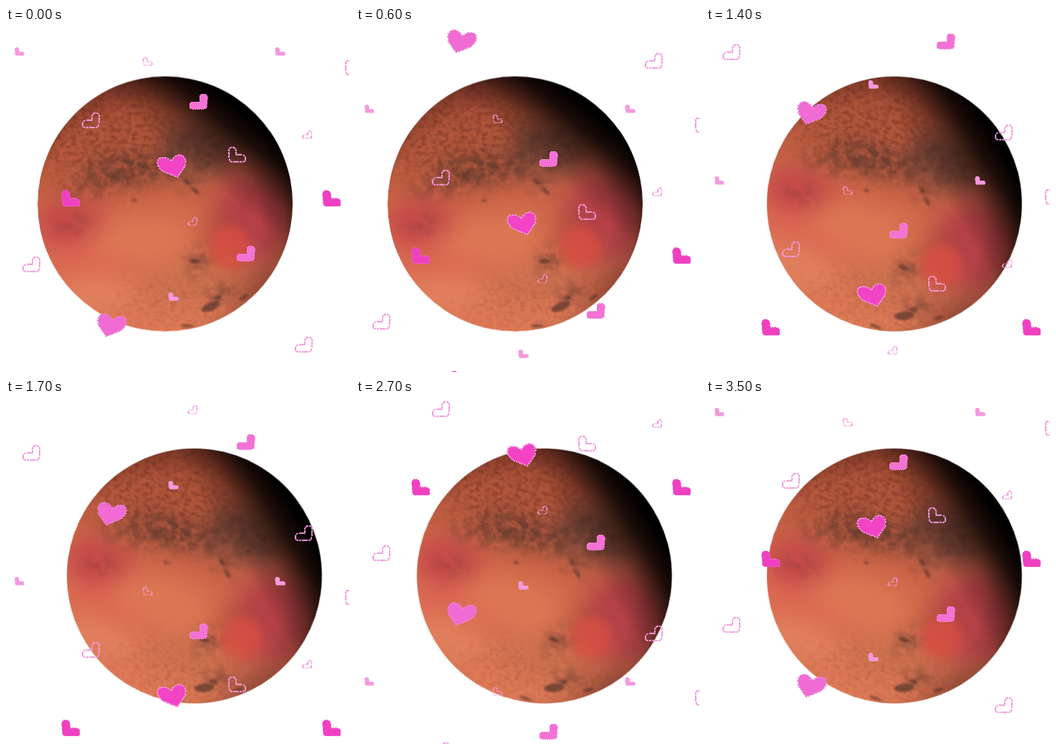
Animation of 480 by 480 pixels, one loop 3.6 s. Source, as an HTML page:

```html
<!DOCTYPE html>
<html lang="en">
<head>
<meta charset="utf-8">
<title>Planet and hearts</title>
<style>
  html, body { margin: 0; width: 100%; height: 100%; overflow: hidden; background: #fff; }
  svg { display: block; width: 480px; height: 480px; }

  .planet { animation: wobble 1.8s step-end infinite; }
  @keyframes wobble {
    0%, 100% { transform: translate(222px, 245.5px); }
    50% { transform: translate(262.8px, 245.5px) rotate(19deg); }
  }

  /* 40px every 300ms, split into two hops of 20px at 0ms and 200ms */
  .fall { animation: fall 3.6s steps(12, end) infinite; }
  .hop { animation: hop .3s step-end infinite; }
  @keyframes fall { from { transform: translateY(0); } to { transform: translateY(480px); } }
  @keyframes hop {
    0%, 100% { transform: translateY(0); }
    66.667% { transform: translateY(20px); }
  }

  #tile { shape-rendering: crispEdges; }
  .line { fill: none; stroke: #f19adc; stroke-width: 2; stroke-dasharray: 4 .6; }
  .hot { fill: #f040c2; stroke: #ea62c6; stroke-dasharray: 2 1; }
  .soft { fill: #f471d5; stroke: #ee8ad6; stroke-dasharray: 2 1; }
  .pale { fill: #f599df; stroke: #f2a4de; }
  .big { fill: #f343c6; stroke: #f08fd9; stroke-width: 2; stroke-dasharray: 3 1; }
  .bigsoft { fill: #f06bd3; stroke: #ea7fd2; stroke-width: 2; stroke-dasharray: 3 1; }
</style>
</head>
<body>
<svg viewBox="0 0 480 480">
  <defs>
    <clipPath id="disc"><circle r="178"/></clipPath>
    <linearGradient id="ground" x1=".35" y1="0" x2=".45" y2="1">
      <stop offset="0" stop-color="#a04a33"/>
      <stop offset=".3" stop-color="#b85a3f"/>
      <stop offset=".55" stop-color="#d36a4d"/>
      <stop offset="1" stop-color="#de7b58"/>
    </linearGradient>
    <linearGradient id="night" gradientUnits="userSpaceOnUse" x1="0" y1="0" x2="116" y2="-138">
      <stop offset=".36" stop-color="#0c0504" stop-opacity="0"/>
      <stop offset=".56" stop-color="#0c0504" stop-opacity=".3"/>
      <stop offset=".78" stop-color="#080302" stop-opacity=".84"/>
      <stop offset=".94" stop-color="#000"/>
    </linearGradient>
    <radialGradient id="limb" gradientUnits="userSpaceOnUse" cx="-25" cy="25" r="213">
      <stop offset=".74" stop-color="#2a0c0c" stop-opacity="0"/>
      <stop offset=".9" stop-color="#1a0608" stop-opacity=".38"/>
      <stop offset="1" stop-color="#120406" stop-opacity=".9"/>
    </radialGradient>
    <filter id="blur" x="-60%" y="-60%" width="220%" height="220%"><feGaussianBlur stdDeviation="16"/></filter>
    <filter id="soften" x="-60%" y="-60%" width="220%" height="220%"><feGaussianBlur stdDeviation="6"/></filter>
    <filter id="spot" x="-50%" y="-50%" width="200%" height="200%"><feGaussianBlur stdDeviation="1.6"/></filter>
    <filter id="rough" filterUnits="userSpaceOnUse" x="-190" y="-190" width="380" height="380" color-interpolation-filters="sRGB">
      <feGaussianBlur in="SourceGraphic" stdDeviation="10" result="area"/>
      <feTurbulence type="fractalNoise" baseFrequency=".07" numOctaves="4" seed="7"/>
      <feColorMatrix values="0 0 0 0 .37  0 0 0 0 .22  0 0 0 0 .18  2.6 0 0 0 -.75"/>
      <feComposite in2="area" operator="in"/>
    </filter>
    <filter id="grain" filterUnits="userSpaceOnUse" x="-190" y="-190" width="380" height="380" color-interpolation-filters="sRGB">
      <feGaussianBlur in="SourceGraphic" stdDeviation="22" result="area"/>
      <feTurbulence type="fractalNoise" baseFrequency=".13 .18" numOctaves="3" seed="3"/>
      <feColorMatrix values="0 0 0 0 .4  0 0 0 0 .16  0 0 0 0 .1  2 0 0 0 -.8"/>
      <feComposite in2="area" operator="in"/>
    </filter>

    <path id="side" d="M-12 6Q-12 0-6 0H2V-6Q3-11 8-11Q14-11 13-3L12 8Q11 10 8 10H-9Q-12 10-12 6Z"/>
    <path id="heart" d="M0-6C3-14 10-16 15-14C21-11 20-3 18 2L8 16L-12 8C-18 4-21-3-19-8C-15-13-6-12 0-6Z"/>
  </defs>

  <g class="planet">
    <g clip-path="url(#disc)">
      <circle r="178" fill="url(#ground)"/>
      <g filter="url(#blur)">
        <ellipse cx="-128" cy="30" rx="52" ry="34" fill="#c23f4a" opacity=".75"/>
        <ellipse cx="-100" cy="80" rx="66" ry="28" fill="#dd6452" opacity=".65"/>
        <ellipse cx="-35" cy="50" rx="75" ry="30" fill="#e07c56" opacity=".7"/>
        <ellipse cx="122" cy="20" rx="58" ry="62" fill="#ad3946" opacity=".85"/>
        <ellipse cx="62" cy="42" rx="22" ry="40" fill="#b8583f" opacity=".5"/>
        <ellipse cx="20" cy="112" rx="60" ry="30" fill="#c8714f" opacity=".6"/>
        <ellipse cx="125" cy="115" rx="44" ry="30" fill="#a8553f" opacity=".7"/>
        <ellipse cx="50" cy="-80" rx="62" ry="40" fill="#6a4136" opacity=".75"/>
        <ellipse cx="-60" cy="-45" rx="64" ry="18" fill="#8a4d39" opacity=".5"/>
        <ellipse cx="-95" cy="125" rx="55" ry="22" fill="#e68a66" opacity=".65"/>
      </g>
      <ellipse cx="91" cy="60" rx="29" ry="30" fill="#d84f43" opacity=".75" filter="url(#soften)"/>
      <g filter="url(#grain)">
        <ellipse cx="-80" cy="-95" rx="100" ry="70" opacity=".6"/>
        <ellipse cx="40" cy="140" rx="120" ry="35" opacity=".25"/>
      </g>
      <g filter="url(#rough)">
        <ellipse cx="-110" cy="-24" rx="36" ry="12" opacity=".6"/>
        <ellipse cx="-60" cy="-48" rx="46" ry="22" opacity=".8"/>
        <ellipse cx="-10" cy="-52" rx="38" ry="18" opacity=".7"/>
        <ellipse cx="45" cy="-75" rx="44" ry="28" opacity=".7"/>
        <ellipse cx="38" cy="-24" rx="20" ry="10" opacity=".6"/>
        <ellipse cx="-128" cy="28" rx="28" ry="12" opacity=".3"/>
        <ellipse cx="46" cy="80" rx="16" ry="22" opacity=".6"/>
        <ellipse cx="78" cy="125" rx="20" ry="12" opacity=".6"/>
      </g>
      <g filter="url(#spot)" fill="#57352c" opacity=".7">
        <ellipse cx="64" cy="143" rx="14" ry="6" transform="rotate(-24 64 143)"/>
        <ellipse cx="41" cy="80" rx="7" ry="3"/>
        <ellipse cx="73" cy="131" rx="6" ry="3"/>
        <ellipse cx="31" cy="170" rx="9" ry="2"/>
        <ellipse cx="110" cy="130" rx="7" ry="2" transform="rotate(-35 110 130)"/>
        <ellipse cx="42" cy="-18" rx="7" ry="2" transform="rotate(38 42 -18)"/>
        <ellipse cx="30" cy="-31" rx="6" ry="2" transform="rotate(35 30 -31)"/>
        <ellipse cx="-43" cy="-5" rx="4" ry="1.5"/>
      </g>
      <circle r="179" fill="url(#limb)" opacity=".75"/>
      <circle r="179" fill="url(#night)"/>
    </g>
  </g>

  <g class="fall"><g class="hop">
    <g id="tile"></g>
    <use href="#tile" y="-476"/>
  </g></g>
</svg>
<script>
  // shape, style, x, y, horizontal scale (negative flips), vertical scale
  const hearts = [
    ['heart', 'big', 231, 192, 1, 1],
    ['heart', 'bigsoft', 148, 414, -1, 1],
    ['side', 'hot', 91, 238, -1, 1.05],
    ['side', 'hot', 455, 238, -1, 1.05],
    ['side', 'soft', 268, 103, 1, 1],
    ['side', 'soft', 334, 315, 1, 1],
    ['side', 'line', 118, 129, .94, .95],
    ['side', 'line', 323, 177, -.94, .95],
    ['side', 'line', 35, 330, .94, .95],
    ['side', 'line', 415, 442, .94, .95],
    ['side', 'line', 486, 56, -.94, .95],
    ['side', 'line', 492, 322, .94, .95],
    ['side', 'pale', 19, 33, -.5, .54],
    ['side', 'pale', 383, 33, -.55, .54],
    ['side', 'pale', 234, 375, -.55, .54],
    ['side', 'line', 198, 47, -.48, .5],
    ['side', 'line', 260, 270, .48, .5],
    ['side', 'line', 420, 149, .5, .5]
  ];
  document.getElementById('tile').innerHTML = hearts.map(([shape, style, x, y, sx, sy]) => {
    const width = style === 'line' && sy < .6 ? ' style="stroke-width:2.8"' : '';
    return `<use href="#${shape}" class="${style}"${width} transform="translate(${x} ${y}) scale(${sx} ${sy})"/>`;
  }).join('');
</script>
</body>
</html>
```
